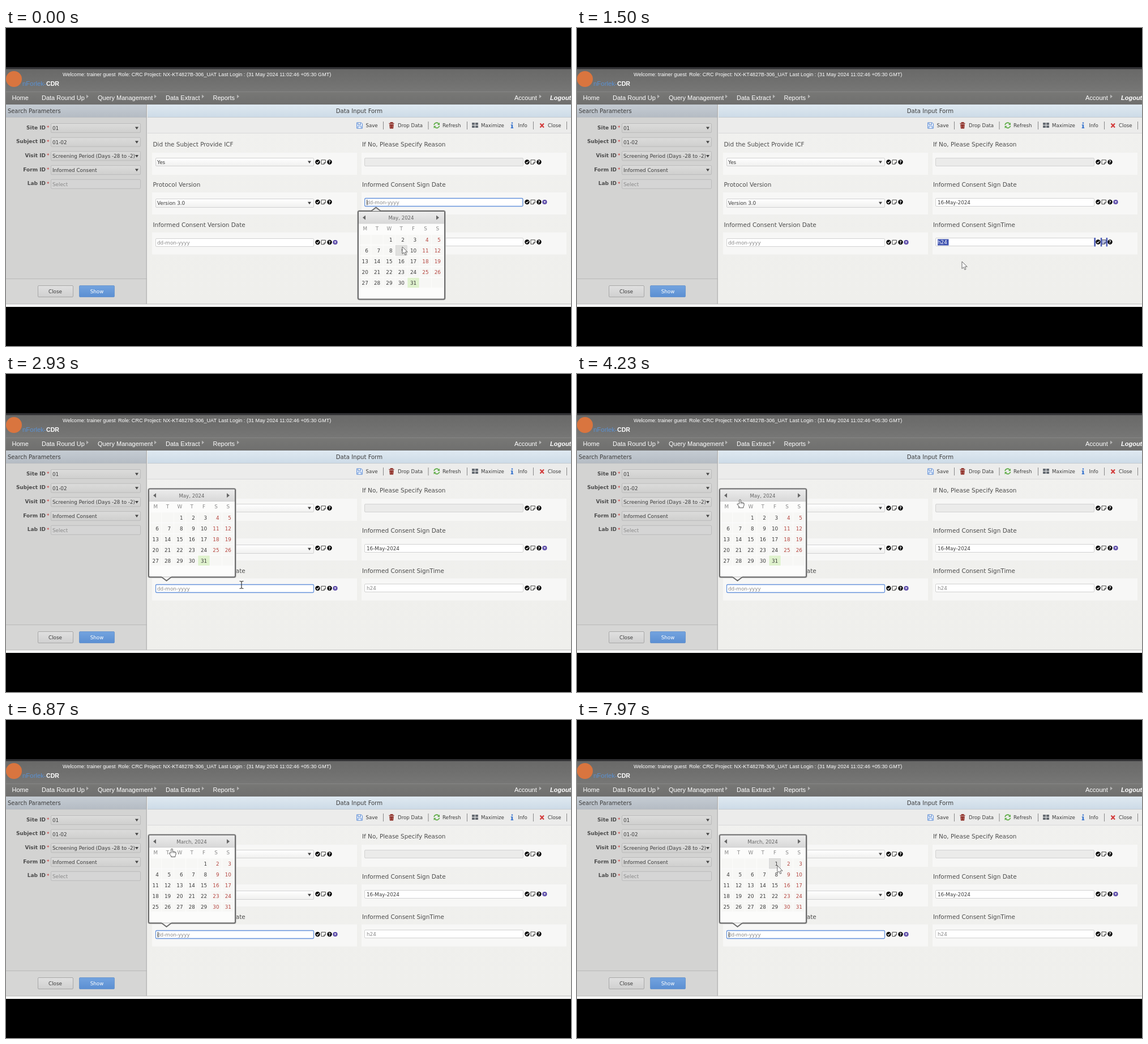
Animation, 998 px wide and 561 px high, one loop 8000 ms. Source, as an HTML page:

```html
<!DOCTYPE html>
<html lang="en">
<head>
<meta charset="utf-8">
<title>Data Input Form</title>
<style>
html, body { margin: 0; width: 100%; height: 100%; overflow: hidden; background: #000; }
svg { display: block; width: 998px; height: 561px; }
text { font-family: "DejaVu Sans", Verdana, sans-serif; font-size: 8.8px; fill: #3c3c3c; white-space: pre; }
.nav { font: 11px "Liberation Sans", Arial, sans-serif; fill: #fff; }
.info { font: 9.12px "Liberation Sans", Arial, sans-serif; fill: #fff; }
.tool { font-size: 8.65px; }
.label { font-size: 10.45px; fill: #4c4c4c; }
.side { font-weight: bold; font-size: 9px; fill: #4c4c4c; }
.hint { fill: #8a8a8a; }
.week { fill: #888; }
.rest { fill: #b5453f; }
</style>
</head>
<body>
<svg id="stage" viewBox="0 0 998 561"></svg>
<script>
const LOOP = 8000, PICKED = 900, OPENED = 2347, APRIL = 5000, MARCH = 6310, BLINK = 530;

const rect = (x, y, w, h, fill, more = '') =>
  `<rect x="${x}" y="${y}" width="${w}" height="${h}" fill="${fill}" ${more}/>`;
const text = (x, y, s, cls = '', more = '') => `<text x="${x}" y="${y}" class="${cls}" ${more}>${s}</text>`;
const path = (d, fill, more = '') => `<path d="${d}" fill="${fill}" ${more}/>`;
const group = (id, body, more = '') => `<g id="${id}" ${more}>${body}</g>`;
const gradient = (id, ...colors) =>
  `<linearGradient id="${id}" x2="0" y2="1">${colors.map((c, i) =>
    `<stop offset="${i / (colors.length - 1)}" stop-color="${c}"/>`).join('')}</linearGradient>`;
const middle = 'text-anchor="middle"';

const box = (x, y, w, h, fill = '#fff', line = '#d2d2d2') =>
  rect(x + .5, y + .5, w - 1, h - 1, fill, `rx="1.5" stroke="${line}"`);
const dropArrow = (x, y) => path(`M${x - 3} ${y - 2}h6l-3 4.5z`, '#444');

function fieldIcons(x, y, clearable) {
  const tick = `<circle cx="${x}" cy="${y}" r="4.2"/>` +
    path(`M${x - 2} ${y}l1.6 1.8 2.7-3.4`, 'none', 'stroke="#fff" stroke-width="1.2"');
  const note = path(`M${x + 6.5} ${y - 3.7}h7.4v4.7l-2.7 2.7h-4.7zM${x + 13.9} ${y + 1}h-2.7v2.7`,
    '#fafaf6', 'stroke="#333" stroke-width=".9"');
  const help = `<circle cx="${x + 21}" cy="${y}" r="4.2"/>` +
    text(x + 21, y + 2.7, '?', '', `${middle} style="font-size:7.5px;font-weight:bold;fill:#fff"`);
  const clear = `<circle cx="${x + 31}" cy="${y}" r="4.1" fill="#5746a5"/>` +
    path(`M${x + 29.5} ${y - 1.5}l3 3m0-3l-3 3`, 'none', 'stroke="#fff" stroke-width="1.1"');
  return tick + note + help + (clearable ? clear : '');
}

function header() {
  const menu = [[10.5, 'Home'], [63, 'Data Round Up', 142], [162, 'Query Management', 262],
    [282, 'Data Extract', 346], [365.5, 'Reports', 408], [898, 'Account', 942]];
  return rect(0, 69, 998, 422, '#efefed') + rect(0, 69, 998, 44, 'url(#top)') + rect(0, 69, 998, 3.5, '#303033') +
    rect(0, 112, 998, 23, 'url(#bar)') + rect(0, 112, 998, .8, '#8a8a8a') +
    '<circle cx="14" cy="90" r="14" fill="#d9753f"/>' +
    text(29, 102, 'nForlek-', 'nav', 'style="fill:#5a91d3;font-size:11.4px"') +
    text(71, 102, 'CDR', 'nav', 'style="font-size:10.6px;font-weight:bold"') +
    text(100, 85, 'Welcome: trainer guest', 'info') + text(198, 85, 'Role: CRC Project: NX-KT4827B-306_UAT', 'info') +
    text(375.3, 85, 'Last Login : (31 May 2024 11:02:46 +05:30 GMT)', 'info') +
    menu.map(([x, name, tip]) => text(x, 127, name, 'nav') +
      (tip ? path(`M${tip} 117.5l4 3.2-4 3.2z`, '#b5b5b5') : '')).join('') +
    text(961, 127, 'Logout', 'nav', 'style="font-weight:bold;font-style:italic"');
}

function sidePanel() {
  const rows = [['Site ID', '01'], ['Subject ID', '01-02'], ['Visit ID', 'Screening Period (Days -28 to -2)'],
    ['Form ID', 'Informed Consent'], ['Lab ID', 'Select']];
  return rect(0, 135, 248.5, 352, '#d3d3d2') + rect(0, 135, 248.5, 22, 'url(#sideHead)') +
    rect(0, 157, 248.5, .8, '#b2b7bc') + text(3, 150, 'Search Parameters', '', 'style="font-size:9.9px"') +
    rect(0, 442, 248.5, 1, '#b9b9b9') + rect(0, 443, 248.5, 44, '#d6d6d5') + rect(247.7, 135, 1, 352, '#aaa') +
    rows.map(([name, value], i) => {
      const y = 168 + i * 24.7, last = i === 4;
      return text(70, y + 10.5, name, 'side', 'text-anchor="end"') +
        text(72, y + 11, '*', '', 'style="fill:#c33"') +
        box(79, y, 159, 17, last ? '#d5d5d5' : 'url(#sideField)', '#bbb') +
        text(82, y + 12, value, last ? 'hint' : '') + (last ? '' : dropArrow(231, y + 8.5));
    }).join('') +
    box(56, 454, 63, 21, 'url(#grayButton)', '#a8a8a8') + text(87, 467.5, 'Close', '', middle) +
    box(129, 454, 63, 21, 'url(#blueButton)', '#6c97cd') + text(160.5, 467.5, 'Show', '', `${middle} style="fill:#fff"`);
}

function toolbar() {
  const items = [[635.5, 'Save'], [692, 'Drop Data'], [771, 'Refresh'], [839, 'Maximize'], [904.5, 'Info'], [957, 'Close']];
  return rect(250, 135, 748, 22, 'url(#formHead)') + text(624, 150, 'Data Input Form', '', `${middle} style="font-size:10.15px"`) +
    rect(250, 157, 748, 1, '#c4cbd1') + rect(250, 158, 748, 27, '#ececeb') + rect(250, 185, 748, 1, '#d9d9d9') +
    items.map(([x, s]) => text(x, 175, s, 'tool')).join('') +
    [666, 745.5, 814, 931, 990].map(x => rect(x, 165, 1, 14, '#888')).join('') +
    path('M619.5 167h8l2 2v8h-10zM621.5 167v3.5h5v-3.5M621.5 177v-4h6v4', '#edf3fc', 'stroke="#5f8ed6"') +
    path('M676.5 168.5h9M679.5 168v-1.3h3.3v1.3', 'none', 'stroke="#8c2c25" stroke-width="1.4"') +
    path('M677.3 170h7.4l-.6 7.5h-6.2z', '#8c2c25') + path('M679.5 171.5v4.5m3-4.5v4.5', 'none', 'stroke="#c98a84" stroke-width=".8"') +
    path('M756 171a4.7 4.7 0 0 1 8-2.3M765.6 172.6a4.7 4.7 0 0 1-8 2.3', 'none', 'stroke="#5bab43" stroke-width="1.7"') +
    path('M766 166.8v4.2h-4.2zM755.6 177v-4.2h4.2z', '#5bab43') +
    [0, 1, 2, 3].map(i => rect(823 + i % 2 * 6, 167 + (i >> 1) * 5, 5, 4, '#666c73')).join('') +
    rect(892.8, 166.5, 2.4, 2.2, '#3f79cf') + path('M891.8 170.2h3.4v5.4h1v1.5h-4.5v-1.5h1v-3.9h-.9z', '#3f79cf') +
    path('M943.5 168.5l6.5 7m0-7l-6.5 7', 'none', 'stroke="#d23a3a" stroke-width="2.2"');
}

function form() {
  const label = (x, y, s) => text(x, y, s, 'label');
  let out = rect(250, 135, 748, 352, 'url(#body)');
  for (const x of [258, 628]) for (const y of [220, 290, 360.5]) out += rect(x, y, 362, 39, '#f7f7f6');
  return out + toolbar() +
    label(259.5, 209, 'Did the Subject Provide ICF') + label(629, 209, 'If No, Please Specify Reason') +
    label(259.5, 280, 'Protocol Version') + label(629, 280, 'Informed Consent Sign Date') +
    label(259.5, 351, 'Informed Consent Version Date') + label(629, 351, 'Informed Consent SignTime') +
    box(264, 229, 280, 15, 'url(#field)') + text(267, 240.3, 'Yes') + dropArrow(536, 236.5) +
    box(264, 301, 280, 16, 'url(#field)') + text(267, 312, 'Version 3.0') + dropArrow(536, 308.7) +
    box(633, 229, 281, 15, '#ebebea') + box(633, 300, 281, 15) + box(264, 371, 280, 15) + box(633, 370, 281, 15) +
    text(267, 381.8, 'dd-mon-yyyy', 'hint') +
    group('noDate', text(637, 311, 'dd-mon-yyyy', 'hint')) + group('date', text(637, 311, '16-May-2024')) +
    fieldIcons(550.5, 236.5) + fieldIcons(550.5, 307) + fieldIcons(550.5, 378, true) +
    fieldIcons(920.5, 236.5) + fieldIcons(920.5, 307, true) + fieldIcons(920.5, 377.5) +
    text(637, 381, 'h24', 'hint') +
    group('selection', rect(637, 372.5, 19.5, 11, '#4054b0') + text(637, 381, 'h24', '', 'style="fill:#fff"') +
      [913.5, 924.8, 934.6].map(x => rect(x, 370, 2.5, 15.5, '#4c5cb8')).join('') + rect(927.3, 374, 7, 7, '#4c5cb8', 'opacity=".4"')) +
    group('focus', rect(0, 0, 279, 14, 'none', 'rx="1.5" stroke="#6794dc" stroke-width="1.3"') +
      `<g id="caret">${rect(3.5, 2.5, 1, 9.5, '#222')}</g>`) +
    rect(0, 486.5, 998, 1, '#b4b4b4') + rect(0, 487.5, 998, 4.5, '#f6f6f5');
}

const months = [['May', 2, 31], ['April', 0, 30], ['March', 4, 31]];
const column = i => 12.2 + i * 21.35;

function monthPage([name, first, days], index) {
  let out = text(76, 15, `${name}, 2024`, '', `${middle} style="font-size:8.6px;fill:#666"`);
  for (let d = 1; d <= days; d++) {
    const slot = first + d - 1, c = slot % 7, y = 54 + 19 * Math.floor(slot / 7);
    if (index === 0 && d === 31) out += rect(column(c) - 10.3, y - 12.3, 20.4, 17.5, '#dff2cd');
    out += text(column(c) + 5.6, y, d, c > 4 ? 'rest' : '', 'text-anchor="end"');
  }
  return group('month' + index, out);
}

function calendar() {
  let cells = '';
  for (let i = 0; i < 35; i++)
    cells += rect(column(i % 7) - 10.3, 41.7 + 19 * Math.floor(i / 7), 20.4, 17.5, '#f7f7f5');
  const tail = (d, fill) => path(d, fill, 'stroke="#6c6c6c" stroke-width="2"');
  return group('popup',
    rect(-1.8, -1.8, 156.6, 159.1, '#bcbcbc', 'rx="4"') +
    rect(0, 0, 153, 155.5, '#fcfcfb', 'rx="2.5" stroke="#6c6c6c" stroke-width="2"') +
    group('tailUp', tail('M23 0l8.5-6.5 8.5 6.5', '#e3e3e3')) +
    group('tailDown', tail('M23 155.5l8.5 6.5 8.5-6.5', '#f8f8f7') + rect(23, 153, 17, 2, '#fcfcfb')) +
    rect(1, 1, 151, 20.5, 'url(#calHead)') + rect(1, 21.5, 151, .8, '#c5c5c5') +
    cells + group('hover', rect(.3, .5, 20, 17.5, '#e0e0de', 'stroke="#cfcfcf" stroke-width=".7"')) +
    group('prevHover', rect(2.5, 3.5, 18, 15, '#efefee', 'stroke="#bbb" stroke-width=".8"')) +
    path('M13 7.5v8l-5-4z', '#666') + path('M138 7.5v8l5-4z', '#666') +
    [...'MTWTFSS'].map((s, i) => text(column(i), 34.2, s, 'week', middle)).join('') +
    months.map(monthPage).join(''));
}

const cursors =
  group('arrow', path('M0 0v12.5l2.9-2.7 2 4.6 2.1-.9-2-4.4h4.2z', '#fff', 'stroke="#444" stroke-width=".8"')) +
  group('beam', path('M-3.5-6.5q3 0 3.5 1 .5-1 3.5-1M0-5.5v11M-3.5 6.5q3 0 3.5-1 .5 1 3.5 1', 'none', 'stroke="#333" stroke-width="1.2"')) +
  group('hand', path('M-1.3 7V.3Q0-1.3 1.3.3v4.2l2 .2 2 .4 1.8 1v3.4l-1.2 2.6V14H-1.3v-1.6L-5 7.7q.5-1.6 2-.5z', '#fff',
    'stroke="#444" stroke-width=".9" stroke-linejoin="round"') + path('M1.3 4.5v3m2-2.8v2.8m2-2.4v2.4', 'none', 'stroke="#444" stroke-width=".6"'));

document.getElementById('stage').innerHTML = '<defs>' +
  gradient('top', '#686867', '#6f6f6e', '#777776') + gradient('bar', '#787876', '#6f6f6e') +
  gradient('sideHead', '#c5ccd3', '#b5bcc4') + gradient('formHead', '#dfe9f1', '#cddbe7') +
  gradient('body', '#f1f1ef', '#efefec') + gradient('field', '#fff', '#f0f0ef') +
  gradient('sideField', '#dcdcdb', '#cfcfce') + gradient('grayButton', '#e0e0e0', '#d0d0d0') +
  gradient('blueButton', '#73a3df', '#5b8fd2') + gradient('calHead', '#ececec', '#d8d8d8') +
  '</defs>' + rect(0, 0, 998, 561, '#000') + header() + sidePanel() + form() + calendar() + cursors;

const parts = {};
document.querySelectorAll('#stage g[id]').forEach(g => parts[g.id] = g);
const show = (id, on) => parts[id].style.display = on ? '' : 'none';
const move = (id, x, y) => parts[id].setAttribute('transform', `translate(${x} ${y})`);

// time, x, y of the pointer's hot spot
const track = [[0, 700, 386], [450, 699, 408], [1200, 698, 412], [1500, 680, 412], [1690, 551, 420], [2070, 423, 383],
  [2400, 423, 383], [2750, 416, 372], [3100, 416, 372], [3500, 385, 335], [3950, 308, 248], [4230, 288, 222],
  [4550, 264, 214], [6350, 264, 214], [6600, 278, 224], [6870, 293, 227.5], [7300, 318, 243], [7700, 351, 256], [8000, 354, 257]];

function pointerAt(t) {
  const i = Math.max(1, track.findIndex(k => k[0] > t));
  const [t0, x0, y0] = track[i - 1], [t1, x1, y1] = track[i];
  const u = (t - t0) / (t1 - t0), e = u * u * (3 - 2 * u);
  return [x0 + (x1 - x0) * e, y0 + (y1 - y0) * e];
}

function draw(t) {
  const [x, y] = pointerAt(t);
  const signing = t < PICKED, open = signing || t >= OPENED;
  const [left, top] = signing ? [622, 323] : [252, 202.7];
  const px = x - left, py = y - top;
  const inside = open && px > 0 && px < 153 && py > 0 && py < 155;
  const month = t < APRIL ? 0 : t < MARCH ? 1 : 2;

  show('noDate', signing);
  show('date', !signing);
  show('selection', t >= PICKED && t < OPENED);
  show('focus', open);
  move('focus', signing ? 633.8 : 264.5, signing ? 300.5 : 371.5);
  const since = signing ? t + 200 : t - OPENED;
  show('caret', Math.floor(since / BLINK) % 2 === 0);

  show('popup', open);
  move('popup', left, top);
  show('tailUp', signing);
  show('tailDown', !signing);
  months.forEach((_, i) => show('month' + i, i === month));

  const col = Math.floor((px - 1.5) / 21.35), row = Math.floor((py - 41) / 19);
  const day = row * 7 + col - months[month][1] + 1;
  show('hover', inside && row >= 0 && col >= 0 && col < 7 && day > 0 && day <= months[month][2]);
  move('hover', column(col) - 10.3, 41.2 + 19 * row);
  const onPrev = inside && px < 21 && py < 20;
  show('prevHover', onPrev);

  const overField = x > 264 && x < 544 && y >= 371 && y < 386;
  const kind = overField ? 'beam' : inside && py < 41 && !onPrev ? 'hand' : 'arrow';
  for (const id of ['arrow', 'beam', 'hand']) show(id, id === kind);
  move(kind, x, y);
}

const start = performance.now();
function tick() {
  draw((performance.now() - start) % LOOP);
  requestAnimationFrame(tick);
}
tick();
</script>
</body>
</html>
```
